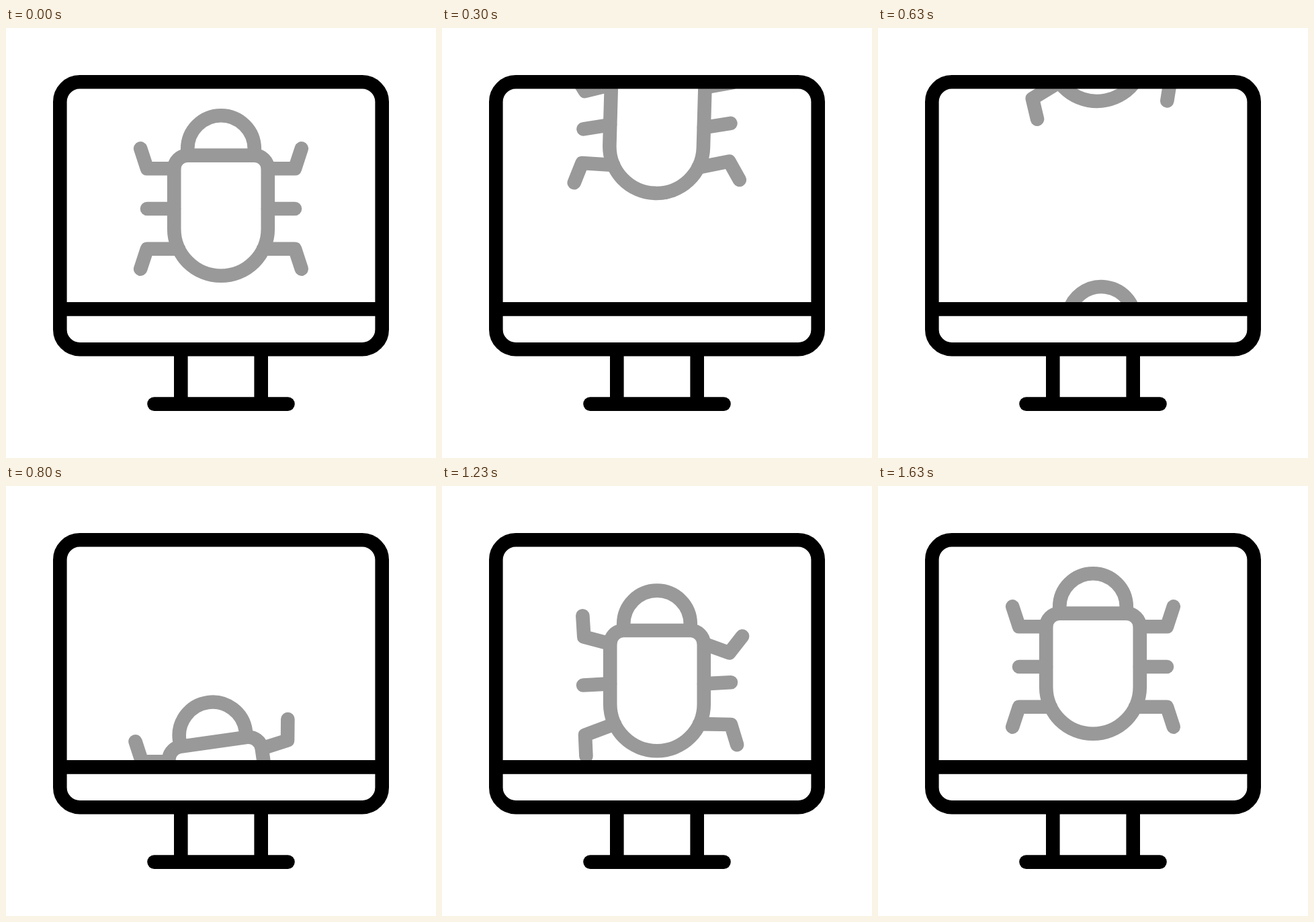
These frames come from a looping animation (640 by 640 pixels, 1670 ms). An HTML page:

```html
<!DOCTYPE html>
<html lang="en">
<head>
<meta charset="utf-8">
<title>Bug crawling across a monitor</title>
<style>
  html, body { margin: 0; width: 100%; height: 100%; overflow: hidden; background: #fff; }
  svg { display: block; width: 100%; height: 100%; }
  path, rect { fill: none; stroke-width: 20.6; stroke-linecap: round; stroke-linejoin: round; }
  .bug { stroke: #999; }
  .monitor { stroke: #000; }
  .monitor .flat { stroke-linecap: butt; }
</style>
</head>
<body>
<svg viewBox="0 0 640 640">
  <defs>
    <clipPath id="screen"><rect x="80" y="80" width="480" height="338"/></clipPath>
  </defs>
  <g id="stage" clip-path="url(#screen)"></g>
  <g class="monitor">
    <rect x="80.3" y="80.3" width="479.4" height="397.9" rx="29.5"/>
    <path class="flat" d="M80 418.4H560M260.3 478V560M379.7 478V560"/>
    <path d="M220.5 559.6H419.5"/>
  </g>
</svg>
<script>
const LOOP = 1670, FRAME = 100 / 3, LAST = 49;
const CENTER = 320, MIDDLE = 269, STRIDE = 30;
const BODY = 'M270 189.6H370A20 20 0 0 1 389.8 209.5V299A69.8 69.8 0 0 1 250.2 299V209.5A20 20 0 0 1 270 189.6Z' +
             'M270.2 189.6V180A49.8 49.8 0 0 1 369.8 180V189.6';

// side: -1 left, 1 right; row: -1 front, 0 middle, 1 back.
// Swing and lean are in degrees, phase in strides.
const LEGS = [
  { side: -1, row: -1, lean: 6.7, swing: 22.8, phase: 0.41 },
  { side: 1, row: -1, lean: 2, swing: 21.5, phase: 0.31 },
  { side: -1, row: 0, lean: -1, swing: 10, phase: 0.5 },
  { side: 1, row: 0, lean: -1, swing: 10, phase: 0.5 },
  { side: -1, row: 1, lean: -15, swing: 17.5, phase: 0.914 },
  { side: 1, row: 1, lean: 13, swing: 29.6, phase: 0.532 }
];

const clamp = value => Math.max(0, Math.min(1, value));

// The body rocks to and fro on a triangle wave, easing in and out of upright.
function tiltAt(age) {
  const swing = 11.3;
  if (age < 5) return -swing * clamp(age / 5);
  if (age > 19) return -swing * clamp((25 - age) / 6);
  return swing * (1 - 2 * Math.abs(age - 12) / 7);
}

function legAngle({ lean, swing, phase }, age) {
  const strength = clamp(age / 5) * clamp((38 - age) / 7);
  return strength * (lean + swing * Math.sin(2 * Math.PI * (age / STRIDE + phase)));
}

function add(parent, tag, attrs) {
  const node = document.createElementNS('http://www.w3.org/2000/svg', tag);
  for (const name in attrs) node.setAttribute(name, attrs[name]);
  return parent.appendChild(node);
}

function makeLeg(parent, leg) {
  const { side, row } = leg;
  const x = CENTER + side * (row > 0 ? 63 : 70), y = MIDDLE + row * 59.7;
  const foot = row ? `l${side * 9.8} ${row * 29.9}` : '';
  const node = add(parent, 'path', { d: `M${x} ${y}H${CENTER + side * 110}${foot}` });
  return age => node.setAttribute('transform', `rotate(${legAngle(leg, age)} ${x} ${y})`);
}

function makeBug(birth, liftAt) {
  const group = add(document.getElementById('stage'), 'g', { class: 'bug' });
  add(group, 'path', { d: BODY });
  const legs = LEGS.map(leg => makeLeg(group, leg));
  return frame => {
    const age = frame - birth;
    group.setAttribute('transform',
      `translate(0 ${liftAt(frame)}) rotate(${tiltAt(age)} ${CENTER} ${MIDDLE})`);
    legs.forEach(pose => pose(age));
  };
}

// One bug walks out at the top while the next walks in from below.
const bugs = [
  makeBug(0, frame => -13.65 * frame),
  makeBug(6, frame => 12.7 * Math.max(0, 39 - frame))
];
const start = performance.now();

function draw() {
  const time = Math.max(0, performance.now() - start) % LOOP;
  // The motion advances in whole steps, 30 per second.
  const frame = Math.min(LAST, Math.floor((time + 4) / FRAME));
  bugs.forEach(pose => pose(frame));
  requestAnimationFrame(draw);
}
draw();
</script>
</body>
</html>
```
